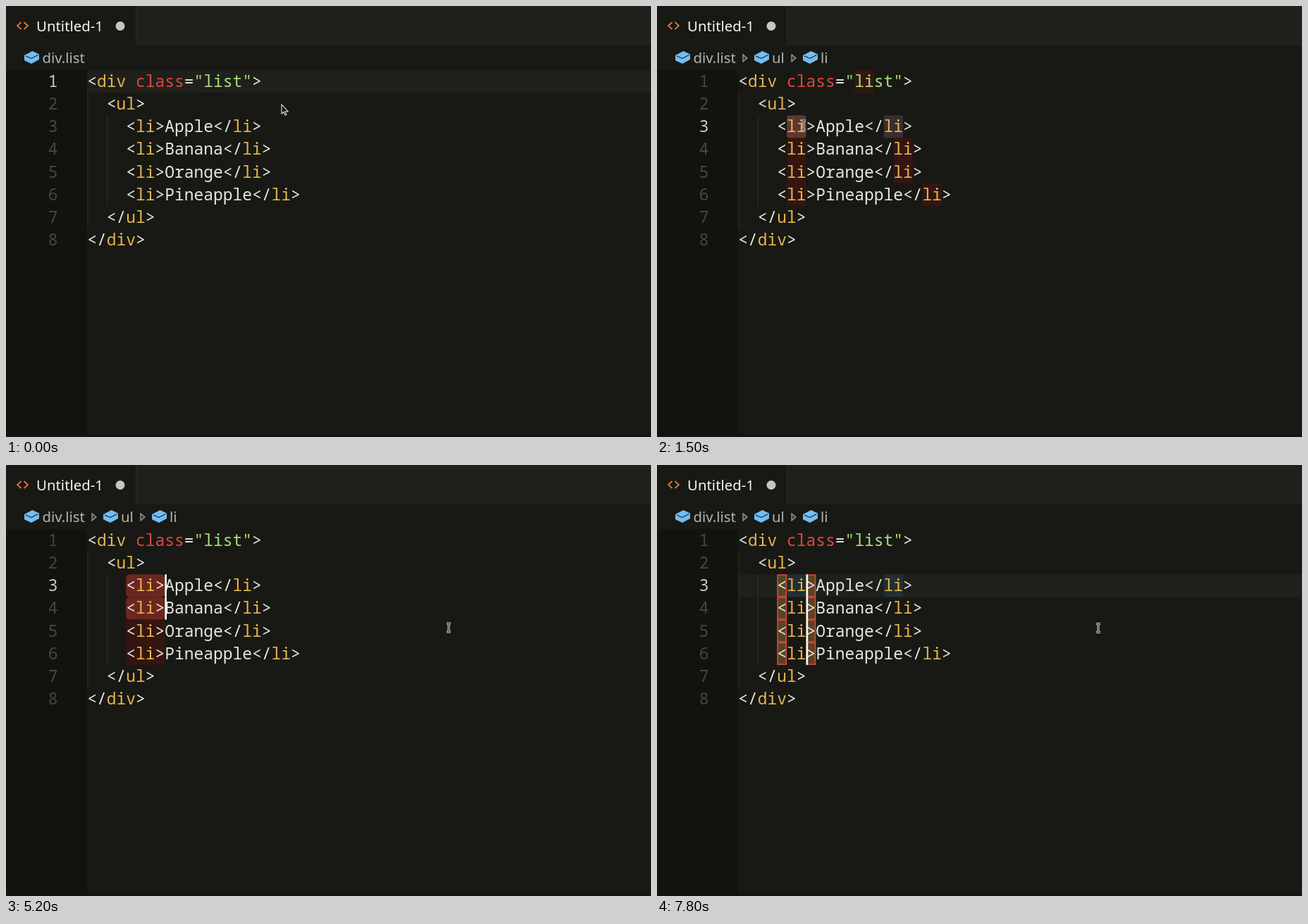
Write an HTML page that moves like this. It is 915 by 612 pixels and loops after 8 s.

```html
<!DOCTYPE html>
<html lang="en">
<head>
<meta charset="utf-8">
<title>Editor multi-selection</title>
<style>
html, body { margin: 0; width: 100%; height: 100%; overflow: hidden; background: #181914; }
svg { display: block; width: 915px; height: 612px; }
text { white-space: pre; }
.code { font: 22.92px "Noto Sans Mono", monospace; fill: #e8e8e2; font-variant-ligatures: none; }
.ui { font: 20.4px "Noto Sans", sans-serif; fill: #b4b4ae; }
.doc { font: 23.15px "Noto Sans", sans-serif; fill: #d0d0c8; }
.tag { fill: #e6b450; }
.attr { fill: #e0483e; }
.str { fill: #a6df7c; }
.num { fill: #464741; text-anchor: end; }
.num.on { fill: #c8c8c3; }
.guide { fill: #2f302b; }
.sel { fill: #6c2620; }
.drag { fill: #57241f; }
.word { fill: #613733; }
.pair { fill: #392e2e; }
.same { fill: #351511; }
.hover { fill: #302919; }
.link { fill: #222f34; }
.bracket { fill: #544524; stroke: #df473d; stroke-width: 1.6; }
.caret { fill: #f8f8f2; }
</style>
</head>
<body>
<svg viewBox="0 0 915 612">
  <defs>
    <g id="cube">
      <path d="M11.500 0 21 4.500V12L10 18 0 13.200V6Z" fill="#72bdf4"/>
      <path d="M2 7 10 10.500 19.500 5.500" fill="none" stroke="#181914" stroke-width="1.1"/>
    </g>
    <path id="crumb" d="M0 0 6 5 0 10Z" fill="#3a3b36" stroke="#a2a29c" stroke-width="1.2"/>
  </defs>

  <rect width="915" height="612" fill="#181914"/>
  <rect x="184" width="731" height="56" fill="#1f201c"/>
  <rect x="184" width="1" height="56" fill="#2b2c27"/>
  <rect y="91" width="115" height="517" fill="#12130f"/>
  <rect y="608" width="915" height="4" fill="#131410"/>

  <path d="M21.5 23 16 28l5.5 5M25.5 23l5.5 5-5.5 5" fill="none" stroke="#e37940" stroke-width="1.7"/>
  <text class="ui" x="43" y="35.5" style="fill:#f4f4f0">Untitled-1</text>
  <circle cx="162" cy="28.5" r="6.5" fill="#c6c6c1"/>

  <use href="#cube" x="26" y="64"/>
  <text class="ui" x="51.5" y="81">div.list</text>
  <g id="crumbs">
    <use href="#crumb" x="122" y="69"/>
    <use href="#cube" x="138" y="64"/>
    <text class="ui" x="163" y="81">ul</text>
    <use href="#crumb" x="191" y="69"/>
    <use href="#cube" x="207" y="64"/>
    <text class="ui" x="232" y="81">li</text>
  </g>

  <rect id="line" x="115" width="800" height="32.1" fill="#1f201c"/>
  <rect class="guide" x="115.5" y="123.1" width="1" height="193"/>
  <rect class="guide" x="143" y="155.3" width="1" height="128.5"/>
  <g id="marks"></g>
  <g id="numbers"></g>
  <g id="code" class="code"></g>
  <g id="carets"></g>

  <g id="popup">
    <rect x="184.5" y="188.5" width="760" height="187" fill="#1f201c" stroke="#42433d"/>
    <text class="code" x="194" y="219">&lt;<tspan class="tag">li</tspan>&gt;</text>
    <text class="doc" x="194" y="266">The li element represents a list item. If its parent element is an ol, ul, or</text>
    <text class="doc" x="194" y="297.7">menu element, then the element is an item of the parent element's list,</text>
    <text class="doc" x="194" y="329.3">as defined for those elements. Otherwise, the list item has no defined</text>
    <text class="doc" x="194" y="361">list-related relationship to any other li element.</text>
  </g>

  <path id="arrow" d="M391 140v13l3-2.5 2 4.5 2-1-2-4.300h4Z" fill="#111" stroke="#e4e4de" stroke-width="1.1"/>
  <g id="beam" fill="none">
    <path d="M-3-6H3M0-6V6M-3 6H3" stroke="#dcdcd6" stroke-width="3"/>
    <path d="M-3-6H3M0-6V6M-3 6H3" stroke="#1a1a17"/>
  </g>
</svg>
<script>
const LOOP = 8000, CHAR = 13.75, ROW = 32.14, LEFT = 115.3, TOP = 91;
const $ = id => document.getElementById(id);
const colX = col => LEFT + col * CHAR;
const rowY = row => TOP + (row - 1) * ROW;
const escape = s => s.replace(/</g, '&lt;').replace(/>/g, '&gt;');
const span = (kind, s) => `<tspan class="${kind}">${s}</tspan>`;

const source = [
  '<div class="list">', '  <ul>',
  ...['Apple', 'Banana', 'Orange', 'Pineapple'].map(name => `    <li>${name}</li>`),
  '  </ul>', '</div>'
];

function highlight(line) {
  return escape(line)
    .replace(/(&lt;\/?)(\w+)/g, (_, open, name) => open + span('tag', name))
    .replace('class="list"', span('attr', 'class') + '=' + span('str', '"list"'));
}

$('code').innerHTML = source.map((line, i) => {
  const indent = line.search(/\S/);
  return `<text x="${colX(indent)}" y="${rowY(i + 1) + 24}">${highlight(line.trim())}</text>`;
}).join('');
$('numbers').innerHTML = source.map((_, i) =>
  `<text class="code num" x="73.5" y="${rowY(i + 1) + 24}">${i + 1}</text>`).join('');

function mark(kind, row, col, length, radius = 0) {
  const inset = kind === 'bracket' ? 0.8 : 0;
  return `<rect class="${kind}" x="${colX(col) + inset}" y="${rowY(row) + inset}" rx="${radius}"
    width="${length * CHAR - 2 * inset}" height="${ROW - 2 * inset}"/>`;
}
const items = [3, 4, 5, 6];
const closing = row => source[row - 1].lastIndexOf('li');

const scenes = {
  none: () => '',
  hover: () => mark('hover', 3, 5, 2),
  word: () => mark('same', 1, 12, 2) + items.map(row => row === 3
    ? mark('word', 3, 5, 2, 4) + mark('pair', 3, closing(3), 2)
    : mark('same', row, 5, 2) + mark('same', row, closing(row), 2)).join(''),
  drag: n => items.map(row => row === 3 ? mark('drag', 3, 4, n, 4)
    : n > 1 ? mark('same', row, 4, n) : '').join(''),
  multi: n => items.map((row, i) => i < n ? mark('sel', row, 4, 4, 5)
    : mark('same', row, 4, 4)).join(''),
  brackets: () => items.map(row => mark('bracket', row, 4, 1) + mark('bracket', row, 7, 1)).join(''),
  linked: () => mark('link', 3, 5, 2) + mark('link', 3, closing(3), 2) + scenes.brackets()
};

// Each step changes only the listed properties; caret is [column, row count] from the active row.
const steps = [
  [0, { mouse: null, caret: null, active: 1, line: true, scene: ['none'], popup: 0 }],
  [100, { mouse: [270.5, 171] }],
  [300, { mouse: [246, 160] }],
  [400, { mouse: [216, 150] }],
  [500, { mouse: [197, 159] }],
  [700, { mouse: [190.5, 167] }],
  [900, { mouse: [184, 171], caret: [9, 1], scene: ['hover'], popup: 0.35 }],
  [1000, { mouse: [188, 171], popup: 1 }],
  [1200, { popup: 0, active: 3, caret: [5, 1], scene: ['none'] }],
  [1300, { caret: [7, 1], line: false, scene: ['word'] }],
  [1500, { mouse: [208, 169], caret: null }],
  [1600, { mouse: [204, 205] }],
  [1700, { mouse: [204, 235] }],
  [1800, { mouse: [403, 203] }],
  [2000, { caret: [7, 1] }],
  [2300, { mouse: [230, 207] }],
  [2500, { mouse: [189, 266], caret: null }],
  [2700, { mouse: [173, 171] }],
  [2900, { caret: [4, 1], line: true, scene: ['none'] }],
  [3300, { mouse: [182, 176], caret: [5, 1], line: false, scene: ['drag', 1] }],
  [3500, { mouse: [196, 172], caret: [6, 1], scene: ['drag', 2] }],
  [3700, { mouse: [208, 168], caret: [7, 1], scene: ['drag', 3] }],
  [3900, { mouse: [215, 167] }],
  [4000, { mouse: [218, 172] }],
  [4200, { mouse: [222, 172], caret: [8, 1], scene: ['drag', 4] }],
  [4400, { mouse: [228, 173] }],
  [4600, { mouse: [232, 174] }],
  [4900, { mouse: [430, 205], caret: null }],
  [5000, { mouse: [629.5, 231] }],
  [5200, { mouse: [628, 231], caret: [8, 2], scene: ['multi', 2] }],
  [5500, { caret: [8, 3], scene: ['multi', 3] }],
  [5700, { mouse: [626, 231.5], caret: [8, 4], scene: ['multi', 4] }],
  [6300, { caret: null }],
  [6500, { caret: [8, 4], line: true, scene: ['brackets'] }],
  [6800, { caret: [7, 4] }],
  [7100, { scene: ['linked'] }],
  [7300, { caret: null }],
  [7800, { caret: [7, 4] }]
];
let state = {};
const timeline = steps.map(([at, change]) => ({ at, ...(state = { ...state, ...change }) }));

function show({ mouse, caret, active, line, scene: [name, count], popup }) {
  $('arrow').style.display = mouse ? 'none' : '';
  $('beam').style.display = mouse ? '' : 'none';
  if (mouse) $('beam').setAttribute('transform', `translate(${mouse})`);
  $('crumbs').style.display = active === 3 ? '' : 'none';
  $('line').style.display = line ? '' : 'none';
  $('line').setAttribute('y', rowY(active));
  [...$('numbers').children].forEach((el, i) => el.classList.toggle('on', i + 1 === active));
  $('marks').innerHTML = scenes[name](count);
  $('popup').style.opacity = popup;
  $('carets').innerHTML = caret ? Array.from({ length: caret[1] }, (_, i) =>
    `<rect class="caret" x="${colX(caret[0])}" y="${rowY(active + i)}" width="2.7" height="${ROW}"/>`).join('') : '';
}

const start = performance.now();
let shown;
function tick() {
  const t = (performance.now() - start) % LOOP;
  const current = timeline.findLast(step => step.at <= t);
  if (current !== shown) show(shown = current);
  requestAnimationFrame(tick);
}
tick();
</script>
</body>
</html>
```
